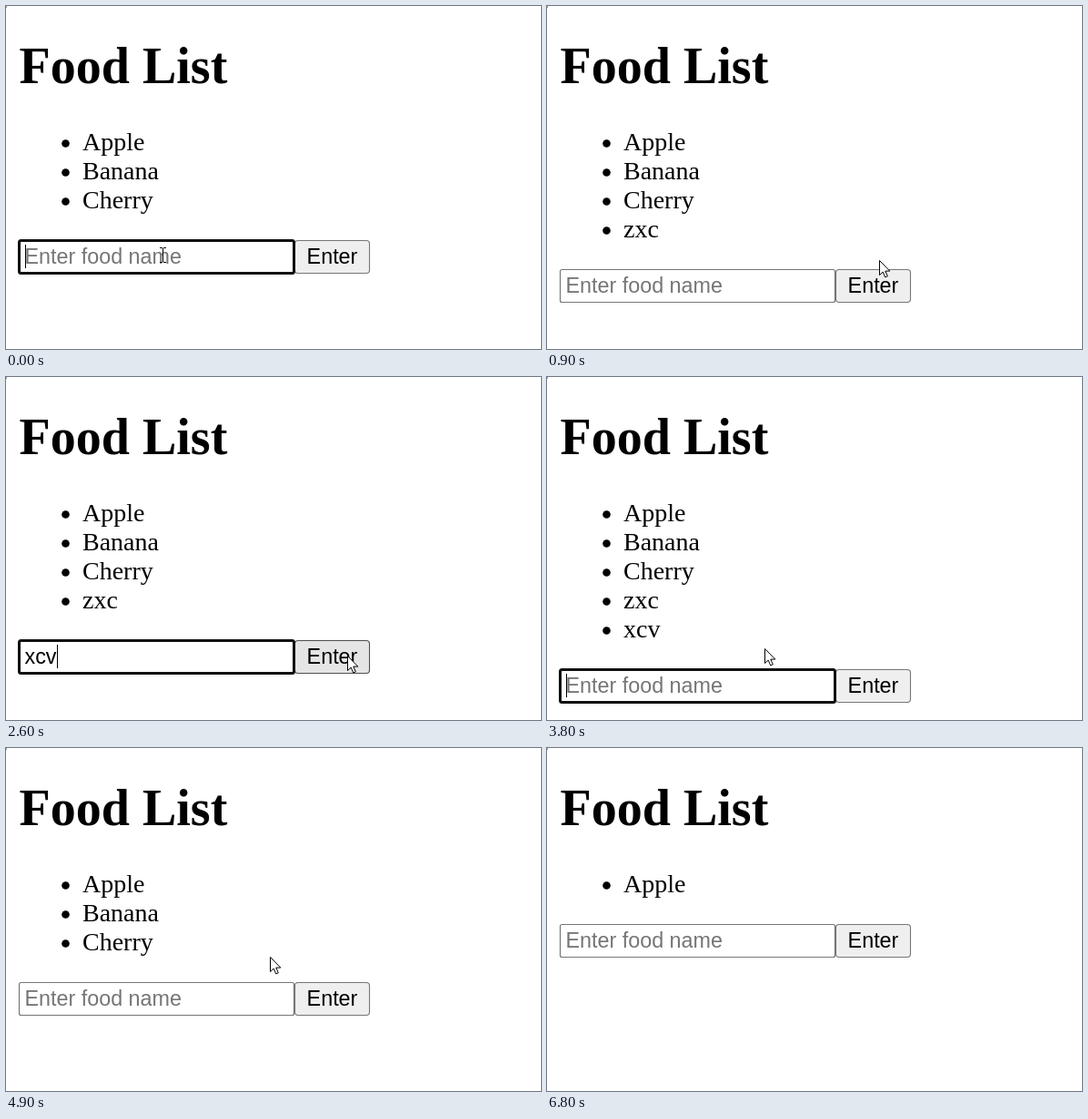
Animation of 588 by 378 pixels, one loop 7.1 s. Source, as an HTML page with a canvas:

```html
<!DOCTYPE html>
<html lang="en">
<head>
<meta charset="utf-8">
<title>Food List</title>
<style>
html, body { margin: 0; width: 100%; height: 100%; overflow: hidden; background: #fff; }
canvas { display: block; }
</style>
</head>
<body>
<canvas id="stage" width="588" height="378"></canvas>
<script>
const ctx = document.getElementById('stage').getContext('2d');
const LOOP = 7100, STEP = 100, ROW = 32;
const SERIF = '"Liberation Serif", "Times New Roman", serif';
const SANS = '23.33px "Liberation Sans", Arial, sans-serif';
const arrow = new Path2D('M0 0V16L3.7 12.6 6.2 18.4 8.8 17.3 6.3 11.6H11.3Z');

const entries = [
  { word: 'zxc', focus: 0, done: 900 },
  { word: 'xcv', focus: 1700, done: 2800 },
  { word: '', focus: 3100, done: 4200 }
];
const removals = [4200, 4600, 5100, 5600];

const home = { x: 172, y: 274 };
const moves = [
  { from: 300, to: 900, x: 366, y: 281 },
  { from: 900, to: 1600, x: 196, y: 308 },
  { from: 2200, to: 2600, x: 376, y: 308 },
  { from: 2700, to: 3000, x: 236, y: 340 },
  { from: 3500, to: 3800, x: 240, y: 300 },
  { from: 3800, to: 4300, x: 273, y: 261 },
  { from: 4400, to: 5500, x: 314, y: 191 },
  { from: 5800, to: 6300, x: 500, y: 178 }
];
const POINTER_GONE = 6400;

function pointerAt(t) {
  let { x, y } = home;
  for (const m of moves) {
    const k = Math.min(1, Math.max(0, (t - m.from) / (m.to - m.from)));
    const eased = k * k * (3 - 2 * k);
    x += (m.x - x) * eased;
    y += (m.y - y) * eased;
  }
  return [Math.round(x), Math.round(y)];
}

function itemsAt(t) {
  const added = entries.filter(e => e.word && e.done <= t).map(e => e.word);
  const removed = removals.filter(r => r <= t).length;
  const items = ['Apple', 'Banana', 'Cherry', ...added];
  return items.slice(0, items.length - removed);
}

// Typing starts 200 ms after focus; pressing the mouse blurs one step before the click lands.
function inputAt(t) {
  const entry = entries.find(e => e.focus <= t && t < e.done);
  if (!entry) return { value: '', focused: false };
  const typed = Math.max(0, (t - entry.focus) / STEP - 1);
  return { value: entry.word.slice(0, typed), focused: t < entry.done - STEP };
}

function text(str, x, y, font, color = '#000') {
  ctx.font = font;
  ctx.fillStyle = color;
  ctx.fillText(str, x, y);
}

function box(x, y, w, r, fill, stroke, line) {
  ctx.beginPath();
  ctx.roundRect(x + 0.5, y + 0.5, w, 36, r);
  ctx.fillStyle = fill;
  ctx.fill();
  ctx.strokeStyle = stroke;
  ctx.lineWidth = line;
  ctx.stroke();
}

function drawList(items) {
  items.forEach((item, i) => {
    const y = 159 + i * ROW;
    text(item, 84, y, '28px ' + SERIF);
    ctx.beginPath();
    ctx.arc(65.5, y - 7.5, 4.3, 0, 7);
    ctx.fill();
  });
}

function drawInput(top, { value, focused }) {
  box(14, top, 302, 2, '#fff', focused ? '#101010' : '#767676', focused ? 3 : 1.2);
  if (value) text(value, 20.5, top + 26, SANS);
  else text('Enter food name', 20.5, top + 26, SANS, '#757575');
  if (focused) {
    const width = ctx.measureText(value).width;
    ctx.fillStyle = '#000';
    ctx.fillRect(Math.round(20.6 + width), top + 5, 1, 26);
  }
}

function drawButton(top, hover) {
  box(317, top, 82, 3.5, hover ? '#e5e5e5' : '#efefef', hover ? '#4f4f4f' : '#767676', 1.1);
  text('Enter', 330.6, top + 26, SANS);
}

function drawArrow(x, y) {
  ctx.save();
  ctx.translate(x - 0.5, y - 0.5);
  ctx.fillStyle = '#fff';
  ctx.strokeStyle = '#000';
  ctx.lineWidth = 1;
  ctx.fill(arrow);
  ctx.stroke(arrow);
  ctx.restore();
}

function drawBeam(x, y) {
  ctx.fillStyle = '#000';
  ctx.fillRect(x, y - 7, 1, 15);
  for (const edge of [-8, 8]) {
    ctx.fillRect(x - 3, y + edge, 3, 1);
    ctx.fillRect(x + 1, y + edge, 3, 1);
  }
}

function draw(t) {
  const items = itemsAt(t);
  const top = 162 + items.length * ROW;
  const [x, y] = pointerAt(t);
  const visible = t < POINTER_GONE;
  const inRow = visible && y >= top && y < top + 37;

  ctx.fillStyle = '#fff';
  ctx.fillRect(0, 0, 588, 378);
  ctx.fillStyle = '#999';
  ctx.fillRect(0, 0, 1, 2);
  text('Food List', 14.6, 85, 'bold 56px ' + SERIF);
  drawList(items);
  drawButton(top, inRow && x >= 317 && x < 400);
  drawInput(top, inputAt(t));
  if (visible) (inRow && x >= 14 && x < 317 ? drawBeam : drawArrow)(x, y);
}

function tick(now) {
  draw(Math.floor(now % LOOP / STEP) * STEP);
  requestAnimationFrame(tick);
}
draw(0);
requestAnimationFrame(tick);
</script>
</body>
</html>
```
